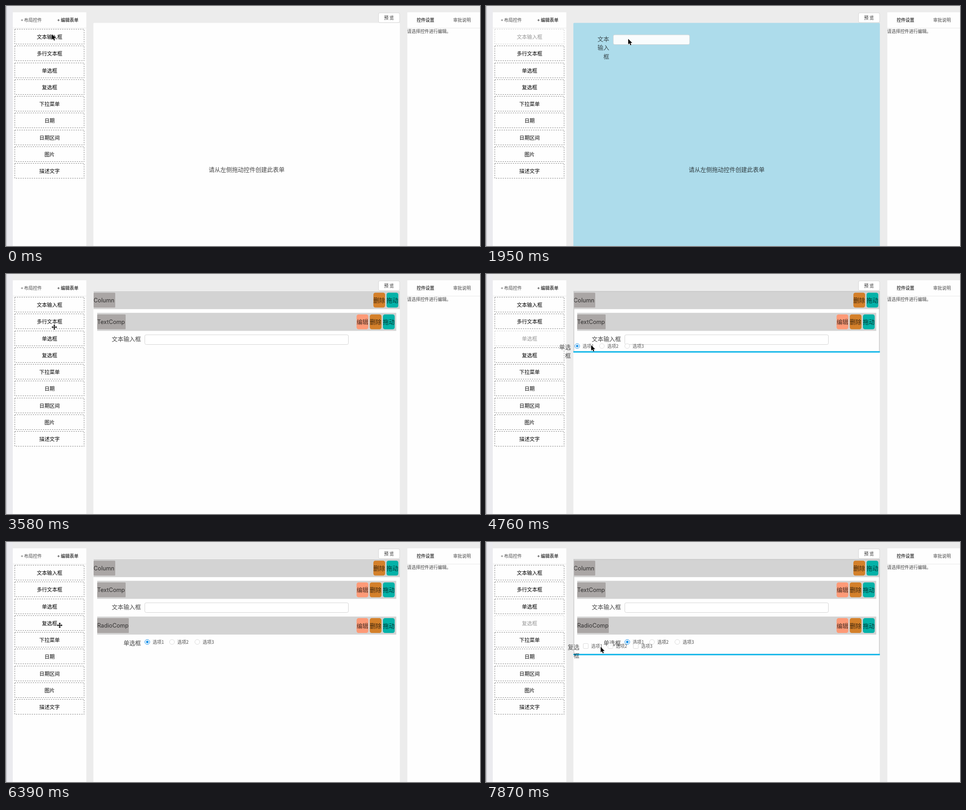
An HTML page for the animation above (8 s loop, 1050 px wide and 533 px high).

```html
<!DOCTYPE html>
<html lang="zh-CN">
<head>
<meta charset="utf-8">
<title>表单设计器</title>
<style>
  html, body { margin: 0; width: 100%; height: 100%; overflow: hidden; background: #ececed; }
  svg { display: block; width: 1050px; height: 533px; }
  text { font-family: "Noto Sans CJK SC", "Noto Sans CJK", sans-serif; white-space: pre; }
  .latin { font-family: Inter, "Liberation Sans", sans-serif; }
</style>
</head>
<body>
<svg id="stage" viewBox="0 0 1050 533"></svg>
<script>
const LOOP = 8000;
const SMALL = 9.72, MEDIUM = 11.34, LARGE = 12.95;
const INK = 'rgba(0,0,0,.72)';
const stage = document.getElementById('stage');

function add(parent, tag, attrs = {}, content = '') {
  const node = document.createElementNS('http://www.w3.org/2000/svg', tag);
  for (const key in attrs) node.setAttribute(key, attrs[key]);
  node.textContent = content;
  return parent.appendChild(node);
}
const group = (parent, attrs) => add(parent, 'g', attrs);
const rect = (parent, x, y, width, height, fill, attrs) =>
  add(parent, 'rect', { x, y, width, height, fill, ...attrs });

// y is the optical centre of the line
function text(parent, x, y, size, content, attrs) {
  return add(parent, 'text', { x, y: y + size * .38, 'font-size': size, fill: INK, ...attrs }, content);
}
const MIDDLE = { 'text-anchor': 'middle' }, END = { 'text-anchor': 'end' };

function inputBox(parent, x, y, width) {
  rect(parent, x + .5, y + .5, width - 1, 21.5, '#fff', { rx: 3, stroke: '#d4d4d4' });
}

function radio(parent, x, y, checked) {
  add(parent, 'circle', { cx: x, cy: y, r: 5.4, fill: '#fff', stroke: checked ? '#1890e8' : '#d9d9d9' });
  if (checked) add(parent, 'circle', { cx: x, cy: y, r: 2.8, fill: '#1890e8' });
}

function checkbox(parent, x, y) {
  rect(parent, x - 5.5, y - 5.5, 11, 11, '#fff', { rx: 1.5, stroke: '#d9d9d9' });
}

function options(parent, x, y, mark) {
  [0, 54.7, 110.8].forEach((offset, i) => {
    mark(parent, x + offset, y, i === 0);
    text(parent, x + offset + 12, y, SMALL, '选项' + (i + 1));
  });
}

function header(parent, x, y, width, name, tagWidth, actions) {
  rect(parent, x, y, width, 40, '#d3d3d3');
  rect(parent, x, y + 3.5, tagWidth, 33, '#aaa6a5', { rx: 1.5 });
  text(parent, x, y + 20, 12.7, name, { class: 'latin' });
  actions.forEach(([label, fill], i) => {
    const left = x + width - 3.5 - 29.2 * (actions.length - i) + 3.2;
    rect(parent, left, y + 3.5, 26, 33, fill, { rx: 4.5 });
    text(parent, left + 13, y + 20, LARGE, label, MIDDLE);
  });
}

// Page background and side panels
rect(stage, 0, 0, 1050, 533, '#ececec');
rect(stage, 0, 0, 15, 533, '#ebebef');
rect(stage, 0, 0, 2, 533, '#c9c9ce');
rect(stage, 15, 14, 163, 519, '#fefefe');
rect(stage, 15, 48.5, 163, 1, '#e9e9e9');
rect(stage, 889, 14, 161, 519, '#fefefe');
rect(stage, 889, 48.5, 161, 1, '#e9e9e9');
text(stage, 56, 31.5, SMALL, '+ 布局控件', MIDDLE);
text(stage, 137, 31.5, SMALL, '+ 编辑表单', { ...MIDDLE, 'font-weight': 700 });
text(stage, 929.3, 31.5, SMALL, '控件设置', { ...MIDDLE, 'font-weight': 700 });
text(stage, 1010.3, 31.5, SMALL, '审批说明', MIDDLE);
text(stage, 888.5, 56.5, SMALL, '请选择控件进行编辑。', { fill: 'rgba(0,0,0,.75)' });

const items = ['文本输入框', '多行文本框', '单选框', '复选框', '下拉菜单', '日期', '日期区间', '图片', '描述文字']
  .map((name, i) => {
    const y = 51.5 + Math.round(37.25 * i);
    const item = group(stage);
    rect(item, 19.5, y, 153.5, 33, 'none', {
      stroke: '#666', 'stroke-width': .9, 'stroke-dasharray': '2.5 2.5'
    });
    text(item, 96.5, y + 16.7, MEDIUM, name, { ...MIDDLE, fill: '#000', 'font-weight': 500 });
    return item;
  });

// Form canvas
const canvas = rect(stage, 193.5, 37.5, 679, 500, '#fefefe', { rx: 2 });
rect(stage, 825.2, 15.2, 46.8, 21.6, '#fff', { rx: 3, stroke: '#d6d6d6' });
text(stage, 848.3, 26, SMALL, '预 览', { ...MIDDLE, fill: 'rgba(0,0,0,.85)', 'font-weight': 500 });
const hint = text(stage, 533, 363.5, LARGE, '请从左侧拖动控件创建此表单', MIDDLE);

const REMOVE = ['删除', '#d4802a'], DRAG = ['拖动', '#04b2a8'], EDIT = ['编辑', '#fd9a77'];
const column = group(stage);
header(column, 194, 38, 678.5, 'Column', 48, [REMOVE, DRAG]);
header(column, 202, 86.3, 662.5, 'TextComp', 63, [EDIT, REMOVE, DRAG]);
text(column, 299, 144.5, LARGE, '文本输入框', END);
inputBox(column, 307, 134.5, 452);
const radioRow = group(stage);
header(radioRow, 202, 165.6, 662.5, 'RadioComp', 70, [EDIT, REMOVE, DRAG]);
text(radioRow, 299, 224, LARGE, '单选框', END);
options(radioRow, 313, 222, radio);
const outline = rect(stage, 194.5, 38.5, 677, 134, 'none', { stroke: '#c6c6c6', 'stroke-width': 1.6 });
const dropLine = rect(stage, 193.5, 172, 679, 3, '#06b4ea');

// Drag previews: the origin is the right end and centre of the first label line
function ghost(lines, drawField) {
  const node = group(stage, { opacity: .93 });
  drawField(node);
  lines.forEach((line, i) => text(node, 0, i * 19.5, LARGE, line, END));
  return node;
}
const ghosts = [
  ghost(['文本', '输入', '框'], node => inputBox(node, 8.5, -9.5, 170)),
  ghost(['单选', '框'], node => options(node, 14, -2, radio)),
  ghost(['复选', '框'], node => options(node, 14, -2, checkbox))
];

const arrow = add(stage, 'path', {
  d: 'M0 0V12.2L2.8 9.6L4.8 14.2L6.9 13.3L4.9 8.9H8.8Z',
  fill: '#000', stroke: '#fff', 'stroke-width': .9, 'paint-order': 'stroke'
});
const armShape = 'M-.8-.8V-3.4H-2.6L0-6L2.6-3.4H.8V-.8Z';
const mover = group(stage);
for (const style of [{ stroke: '#fff', 'stroke-width': 1.8 }, {}])
  for (let turn = 0; turn < 4; turn++)
    add(mover, 'path', { d: armShape + 'M-.9-.9H.9V.9H-.9Z', transform: `rotate(${turn * 90})`, ...style });

// Pointer stops, sampled at a fixed pace in each stroke: start time, kind, then x,y pairs
const STEP = 146;
const strokes = [
  [0, 'arrow', [[101.5, 62.5]]],
  [300, 'move', [[100, 69], [99, 68]]],
  [1070, 'arrow', [[101, 68], [120, 68], [151, 68]]],
  [1500, 'arrow', [[211, 69], [268, 71], [315, 73], [315, 73], [315, 73]]],
  [2540, 'arrow', [[300, 78], [250, 92], [190, 103], [145, 110]]],
  [3130, 'move', [[118, 113], [110, 111]]],
  [3580, 'move', [[107, 118], [103, 134], [101, 142]]],
  [4170, 'arrow', [[105, 143], [124, 147], [168, 154], [230, 162], [233, 158], [235, 158], [236, 158], [236, 158]]],
  [6090, 'arrow', [[188, 168], [138, 181]]],
  [6390, 'move', [[119, 185], [108, 183], [103, 181]]],
  [6990, 'arrow', [[106, 182], [122, 189], [152, 203], [188, 216], [223, 226], [249, 233], [254, 233]]]
];
const stops = strokes.flatMap(([start, kind, points]) =>
  points.map(([x, y], i) => ({ time: start + i * STEP, kind, x, y })));

// Each drag: time span, palette item, time the canvas reacts
const drags = [
  { from: 1215, to: 2100, item: 0, over: 1645 },
  { from: 4315, to: 5650, item: 2, over: 4605 },
  { from: 7135, to: LOOP, item: 3, over: 7570 }
];

const show = (node, on) => node.setAttribute('display', on ? 'inline' : 'none');
const place = (node, x, y) => node.setAttribute('transform', `translate(${x} ${y})`);

function render(time) {
  const index = stops.findLastIndex(stop => stop.time <= time);
  const pointer = stops[Math.max(index, 0)];
  const previous = stops[Math.max(index - 1, 0)];
  const active = drags.findIndex(drag => time >= drag.from && time < drag.to);
  const drag = drags[active];
  const over = Boolean(drag) && time >= drag.over;
  const hasColumn = time >= drags[0].to;
  const hasRadio = time >= drags[1].to;
  const bottom = hasRadio ? 249.5 : 172.5;

  items.forEach((item, i) => item.setAttribute('opacity', drag && drag.item === i ? .4 : 1));
  canvas.setAttribute('fill', over && !hasColumn ? '#addceb' : '#fefefe');
  show(hint, !hasColumn);
  show(column, hasColumn);
  show(radioRow, hasRadio);
  outline.setAttribute('height', bottom - 38.5);
  show(outline, hasColumn && (drag ? over : pointer.x > 194));
  dropLine.setAttribute('y', bottom - 1);
  show(dropLine, hasColumn && over);

  // The preview trails the pointer by one stop
  ghosts.forEach((node, i) => {
    show(node, i === active);
    place(node, previous.x - 42, previous.y);
  });
  show(arrow, pointer.kind === 'arrow');
  show(mover, pointer.kind === 'move');
  place(arrow, pointer.x, pointer.y);
  place(mover, pointer.x, pointer.y);
}

const begin = performance.now();
function tick() {
  render((performance.now() - begin) % LOOP);
  requestAnimationFrame(tick);
}
tick();
</script>
</body>
</html>
```
